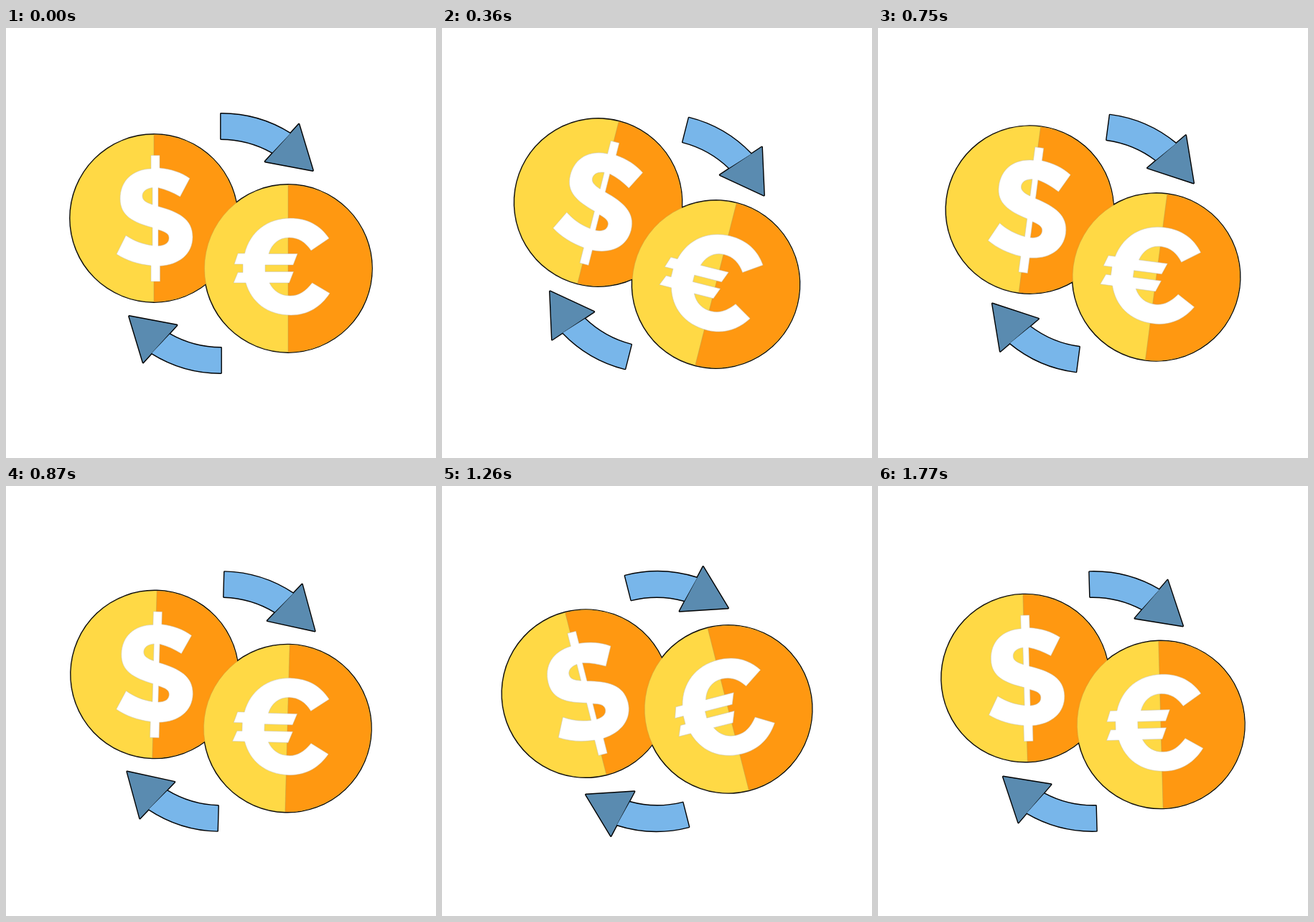
Write an HTML page with a canvas that moves like this. It is 599 by 599 pixels and loops after 1.8 s.

```html
<!DOCTYPE html>
<html lang="en">
<head>
<meta charset="utf-8">
<title>Currency exchange</title>
<style>
html, body { margin: 0; width: 100%; height: 100%; overflow: hidden; background: #fff; }
canvas { display: block; }
</style>
</head>
<body>
<canvas id="stage" width="599" height="599"></canvas>
<script>
const ctx = document.getElementById('stage').getContext('2d');

const SIZE = 599, LOOP = 1800, STEP = 30, SWING = 15;
const CX = 299.5, CY = 300, R = 116.5;
const YELLOW = '#ffd945', ORANGE = '#ff9811', BLUE = '#78b6ea', STEEL = '#5a8bb0';
const SEAM = 'rgba(165, 150, 85, 0.4)', EDGE = 'rgba(190, 190, 185, 0.6)';
const TAU = Math.PI * 2;

const disc = (x, y) => {
  const p = new Path2D();
  p.arc(x, y, R, 0, TAU);
  return p;
};

const half = (x, y) => {
  const p = new Path2D();
  p.arc(x, y, R, -Math.PI / 2, Math.PI / 2);
  p.closePath();
  return p;
};

const seam = (x, y) => new Path2D(`M${x} ${y - R} V${y + R}`);

const dollar = new Path2D(`
  M202 177.5 H214 V195 C230 196.5 244 201 256 209.5 L242.5 235
  C232 229 223 225 212 222.5 V248.5 C240 256 260 266 260 291
  C260 315 241 330 214.5 331.5 V353 H202 V331
  C184 329 168 324 154 315 L167 289 C179 297 190 301 204 303
  V278 C178 271 159 262 159 238 C159 213 176 197 202 196 Z
  M204 222.5 C195 223.5 190 228 190 234 C190 240 195 243 204 246 Z
  M212 281 V303.5 C222 303 227 299 227 292.5 C227 286.5 222 284 212 281 Z`);

const euro = new Path2D(`
  M450 293 L425 310 C417 298 407 292 394.5 292 C380 292 370 301 366 314.5
  H406 L400 330 H361 V339.5 H400.5 L394.5 355 H367
  C373 367 383 373 396 373 C408 373 417 367 426.5 355 L451 369.5
  C439 388 421 400 397 400 C364 400 342 382 334 355
  H317 L323 340.5 H330 V329 H318 L323 314 H332.5
  C340 284 364 265 396 265 C420 265 438 275 450 293 Z`);

const coins = [
  { x: 206, y: 265, sign: dollar },
  { x: 393, y: 335, sign: euro }
].map(c => ({ ...c, face: disc(c.x, c.y), shade: half(c.x, c.y), seam: seam(c.x, c.y) }));

// Arrow parts are relative to the pivot.
const band = new Path2D('M0 -180.5 A180.5 180.5 0 0 1 96.5 -153 L71.5 -126.5 A145.5 145.5 0 0 0 0 -145.5 Z');
const head = new Path2D('M108.5 -166 L128 -101.5 L61.5 -114 Z');

function withArrows(paint) {
  for (const turn of [0, Math.PI]) {
    ctx.save();
    ctx.translate(CX, CY);
    ctx.rotate(turn);
    paint();
    ctx.restore();
  }
}

function fill(path, color) {
  ctx.fillStyle = color;
  ctx.fill(path, 'evenodd');
}

function line(path, color, width) {
  ctx.strokeStyle = color;
  ctx.lineWidth = width;
  ctx.stroke(path);
}

const rim = path => line(path, '#000', 2.8);

function draw(time) {
  const t = Math.floor((time % LOOP) / STEP) * STEP;
  const angle = SWING * Math.sin(TAU * t / LOOP) * Math.PI / 180;

  ctx.fillStyle = '#fff';
  ctx.fillRect(0, 0, SIZE, SIZE);
  ctx.save();
  ctx.lineJoin = 'round';
  ctx.translate(CX, CY);
  ctx.rotate(angle);
  ctx.translate(-CX, -CY);

  // Dark rim goes under all fills, so only the outer silhouette shows it.
  withArrows(() => { rim(band); rim(head); });
  coins.forEach(c => rim(c.face));

  withArrows(() => { fill(band, BLUE); fill(head, STEEL); });
  for (const c of coins) {
    fill(c.face, YELLOW);
    fill(c.shade, ORANGE);
    line(c.seam, SEAM, 1);
    line(c.face, SEAM, 0.8);
    fill(c.sign, '#fff');
    line(c.sign, EDGE, 0.8);
  }
  ctx.restore();
}

const start = performance.now();
function frame() {
  draw(performance.now() - start);
  requestAnimationFrame(frame);
}
frame();
</script>
</body>
</html>
```
